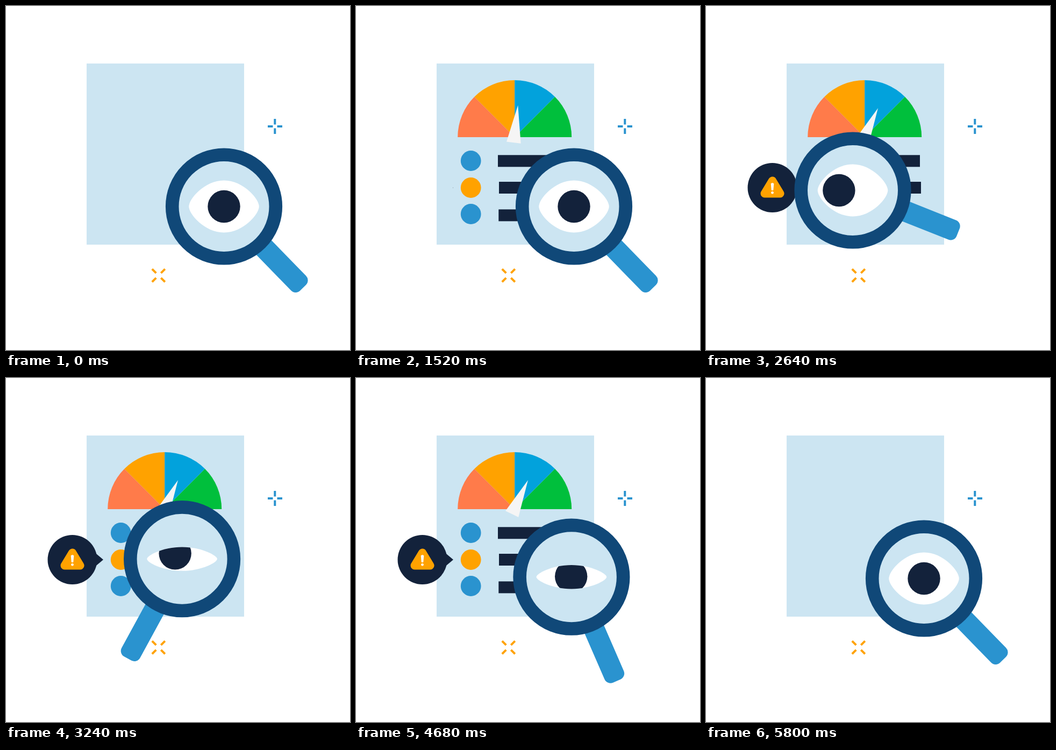
Write an HTML page that moves like this. It is 640x640 px and loops after 6000 ms.

```html
<!DOCTYPE html>
<html lang="en">
<head>
<meta charset="utf-8">
<title>Report inspection</title>
<style>
html, body { margin: 0; width: 100%; height: 100%; overflow: hidden; background: #fff; }
svg { display: block; width: 100%; height: 100%; }
</style>
</head>
<body>
<svg viewBox="0 0 640 640">
  <defs>
    <clipPath id="sweep"><path id="sweepPath"/></clipPath>
    <clipPath id="lids"><path id="lidPath"/></clipPath>
  </defs>
  <path d="M150 107H443V444H150Z" fill="#cce5f2"/>
  <path d="M500.3 210V220.5M500.3 227.5V238M487 224H496.5M504.5 224H514" stroke="#2a93cf" stroke-width="4"/>
  <path d="M4.5 4.5L12 12M-4.5 4.5L-12 12M4.5-4.5L12-12M-4.5-4.5L-12-12" transform="translate(283.8 501.3)" stroke="#ffa200" stroke-width="4"/>

  <g clip-path="url(#sweep)"><g id="gauge" transform="translate(295.2 244)"></g></g>
  <path id="needle" d="M0-59.6L12.8 10.5L-14 10Z" fill="#f5f5f5"/>
  <g id="dots"></g>
  <g id="bars" fill="#13223b"></g>

  <g id="bubble">
    <g transform="translate(-57.5 0)">
      <circle r="46" fill="#13223b"/>
      <path d="M42-13L57.5 0L42 13Z" fill="#13223b"/>
      <path d="M0-13L14.5 11H-14.5Z" fill="#ffa200" stroke="#ffa200" stroke-width="15" stroke-linejoin="round"/>
      <path d="M-2.8-7.5Q0-10.5 2.8-7.5L1.8 4.5Q0 6-1.8 4.5Z" fill="#fff"/>
      <circle cy="9.3" r="2.4" fill="#fff"/>
    </g>
  </g>

  <g id="glass">
    <rect id="handle" x="90" y="-19.5" width="121" height="39" rx="12" fill="#2a93cf"/>
    <circle r="96.3" fill="#cce5f2" stroke="#104878" stroke-width="24.6"/>
    <g clip-path="url(#lids)">
      <path d="M-80-60H80V60H-80Z" fill="#fff"/>
      <circle id="pupil" r="30.2" fill="#13223b"/>
    </g>
  </g>
</svg>
<script>
const LOOP = 6000;
const $ = id => document.getElementById(id);
const set = (el, name, value) => el.setAttribute(name, value);
const add = (parent, tag, attrs) => {
  const el = document.createElementNS('http://www.w3.org/2000/svg', tag);
  for (const k in attrs) set(el, k, attrs[k]);
  return parent.appendChild(el);
};

const smooth = u => u * u * (3 - 2 * u);
const easeIn = n => u => u ** n;
const easeOut = n => u => 1 - (1 - u) ** n;
const ramp = (t, start, dur, ease = smooth) =>
  ease(Math.min(1, Math.max(0, (t - start) / dur)));
const mix = (a, b, p) => a + (b - a) * p;

const polar = (r, deg) => {
  const a = deg * Math.PI / 180;
  return [r * Math.cos(a), r * Math.sin(a)];
};

['#ff7b4a', '#ffa200', '#02a2dc', '#00bf3c'].forEach((fill, i) => {
  const a = polar(106, 180 + i * 45), b = polar(106, 225 + i * 45);
  add($('gauge'), 'path', { d: `M0 0L${a}A106 106 0 0 1 ${b}Z`, fill });
});

const dots = [[288, '#2a93cf', 412], [338, '#ffa200', 520], [387, '#2a93cf', 412]].map(
  ([cy, fill, start]) => ({ start, el: add($('dots'), 'circle', { cx: 213.7, cy, fill }) }));

const bars = [[264, 277.3], [266, 327], [265.3, 378.4]].map(([x, y], i) => ({
  start: 520 + i * 360,
  end: 5280 - i * 100,
  el: add($('bars'), 'rect', { x, y, height: 22 })
}));

// Stops of the lens: position, handle angle, pupil offset
const stops = [
  { x: 405.5, y: 373, turn: 45.8, px: 0, py: 0 },
  { x: 273, y: 343, turn: 21.6, px: -25.7, py: 0 },
  { x: 342.5, y: 335, turn: 145.1, px: -9.5, py: -13.2 }
];

function lens(t) {
  let from = 0, move, turn;
  if (t < 2960) {
    move = ramp(t, 2040, 600);
    turn = ramp(t, 2000, 840, easeOut(4));
  } else if (t < 4400) {
    from = 1;
    move = turn = ramp(t, 2960, 700, easeOut(3));
  } else {
    from = 2;
    move = ramp(t, 4400, 690, easeOut(5));
    turn = ramp(t, 4400, 690, easeOut(3));
  }
  const a = stops[from], b = stops[(from + 1) % 3];
  const at = (key, p) => mix(a[key], b[key], p);
  const look = from === 2 ? move : turn;
  return { x: at('x', move), y: at('y', move), turn: at('turn', turn), px: at('px', look), py: at('py', look) };
}

function eyeOpen(t) {
  const start = [4400, 2960, 2000, 0].find(s => t >= s);
  return t < start + 200
    ? 1 - ramp(t, start, 200, easeIn(2))
    : ramp(t, start + 200, 440, easeOut(3));
}

function needleAngle(t) {
  if (t < 720) return mix(-90, 29, ramp(t, 0, 720));
  if (t < 1300) return mix(29, -3, ramp(t, 720, 580));
  return mix(-3, 24.8, ramp(t, 1300, 580));
}

function draw(t) {
  const sweep = 180 * (ramp(t, 0, 720) - ramp(t, 5080, 695));
  set($('sweepPath'), 'd', sweep > 0.01
    ? `M295.2 244.5h-110A110 110 0 0 1 ${polar(110, 180 + sweep).map((v, i) => v + [295.2, 244.5][i])}Z`
    : 'M0 0');

  const size = ramp(t, 0, 400) - ramp(t, 5020, 380);
  set($('needle'), 'transform', `translate(295 244) rotate(${needleAngle(t)}) scale(${size})`);

  for (const d of dots)
    set(d.el, 'r', 18.9 * (ramp(t, d.start, 400) - ramp(t, 5220, 400)));
  for (const b of bars)
    set(b.el, 'width', 134 * (ramp(t, b.start, 400) - ramp(t, b.end, 300)));

  const pop = ramp(t, 1520, 360, easeOut(3)) - ramp(t, 5480, 320, easeIn(3));
  set($('bubble'), 'transform', `translate(181 338) scale(${pop})`);

  const g = lens(t);
  set($('glass'), 'transform', `translate(${g.x} ${g.y})`);
  set($('handle'), 'transform', `rotate(${g.turn})`);
  set($('pupil'), 'cx', g.px);
  set($('pupil'), 'cy', g.py);

  const h = 48.5 * Math.max(0.002, eyeOpen(t)), k = h * 0.29;
  set($('lidPath'), 'd',
    `M-65.3 0C-65.3 ${-k} -36 ${-h} 0 ${-h}S65.3 ${-k} 65.3 0S36 ${h} 0 ${h}S-65.3 ${k} -65.3 0Z`);
}

const began = performance.now();
function tick() {
  draw((performance.now() - began) % LOOP);
  requestAnimationFrame(tick);
}
tick();
</script>
</body>
</html>
```
